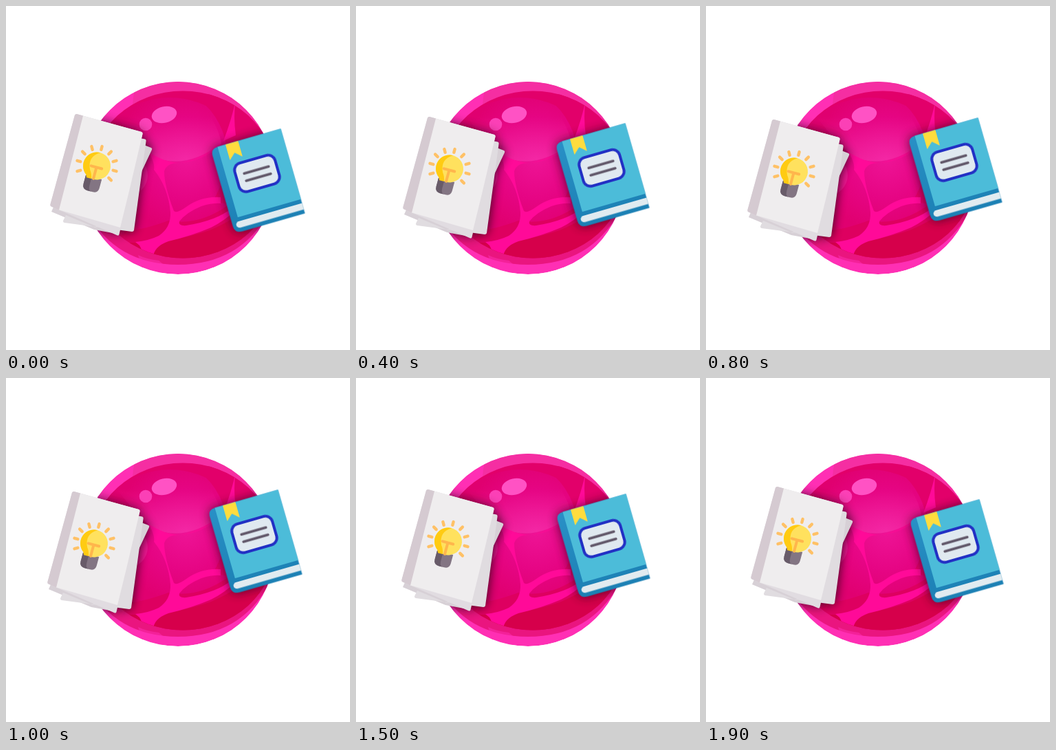
Animation, 500 px wide and 500 px high, one loop 2 s. Source, as an HTML page:

```html
<!DOCTYPE html>
<html lang="en">
<head>
<meta charset="utf-8">
<title>Ideas and books</title>
<style>
  html, body { margin: 0; width: 100%; height: 100%; overflow: hidden; background: #fff; }
  svg { display: block; width: 100%; height: 100%; }
  .papers { animation: papers 2s infinite steps(4); }
  .book { animation: book 2s infinite steps(4); }
  @keyframes papers {
    0%, 100% { transform: translate(0, 0); }
    20%, 80% { transform: translate(4px, 4px); }
    40%, 60% { transform: translate(-4px, 8px); }
  }
  @keyframes book {
    0%, 100% { transform: translate(0, 0); }
    20%, 80% { transform: translate(-8px, -8px); }
    40%, 60% { transform: translate(-4px, -16px); }
  }
</style>
</head>
<body>
<svg viewBox="0 0 500 500">
  <defs>
    <clipPath id="ball"><circle cx="250" cy="250" r="140"/></clipPath>
    <clipPath id="core"><ellipse cx="257" cy="245" rx="134" ry="121.5"/></clipPath>
    <radialGradient id="glow" gradientUnits="userSpaceOnUse" cx="262" cy="222" r="105">
      <stop offset="0" stop-color="#ee1496"/>
      <stop offset=".55" stop-color="#e60584"/>
      <stop offset="1" stop-color="#e00070"/>
    </radialGradient>
    <linearGradient id="sheen" x1="0" y1="0" x2="0" y2="1">
      <stop offset=".3" stop-color="#ff4dc0" stop-opacity="0"/>
      <stop offset="1" stop-color="#ff4dc0" stop-opacity=".35"/>
    </linearGradient>
    <linearGradient id="spine" x1="0" y1="0" x2="0" y2="1">
      <stop offset="0" stop-color="#2990c6"/>
      <stop offset="1" stop-color="#1c80b4"/>
    </linearGradient>
    <filter id="blur" x="-30%" y="-30%" width="160%" height="160%">
      <feGaussianBlur stdDeviation="7.5"/>
    </filter>
    <path id="bookShape" d="M9 -.5H104.500V127.500H10Q-1.500 127.500 -1.500 116V10Q-1.500 -.5 9 -.5Z"/>
    <g id="backSheets">
      <path d="M190 198L211 206Q213 207 212 209L155 330L128 325L66 299L70 290Z" fill="#d7d0d6"/>
      <path d="M190 191L202 193.500Q204 194 203.500 197L186 326Q185.500 328 183 328L85 315Q82 314 83.500 311L87 304L130 322Z" fill="#e0dce0"/>
    </g>
    <path id="frontSheet" d="M100 158.500Q101 156.500 103 157L197 183Q199 184 198.500 186L164.500 332Q164 334 162 333.500L66 291.500Q64 291 64.500 288Z"/>
  </defs>

  <g clip-path="url(#ball)">
    <circle cx="250" cy="250" r="140" fill="#ff2fb4"/>
    <path d="M188 118Q183 136 184 160L380 200L400 110L250 100Z" fill="#f52ea2"/>
    <path d="M118 300Q160 376 250 376Q340 376 382 300Z" fill="#ea157f"/>

    <g clip-path="url(#core)">
      <rect x="110" y="110" width="290" height="280" fill="#e2006a"/>
      <ellipse cx="238" cy="232" rx="110" ry="99" fill="url(#glow)"/>
      <path d="M272 130Q312 155 321 205Q322 250 300 284L390 300V120Z" fill="#e2006a"/>
      <path d="M120 320Q160 340 236 312Q280 320 322 290L390 270V390H120Z" fill="#de0060"/>
      <path d="M120 334Q160 346 202 344Q240 344 296 326Q335 310 385 270V390H120Z" fill="#d6004b"/>

      <path d="M160 160Q190 200 216 220Q262 238 313 200Q306 160 270 134Q200 130 160 160Z" fill="url(#sheen)"/>
      <ellipse cx="178" cy="246" rx="28" ry="29" fill="#ff4dc0" opacity=".25"/>

      <g fill="#ff0a98">
        <path d="M334 136Q328 165 316 196L334 188Q330 160 334 136Z"/>
        <path d="M206 211Q217 228 215 238Q236 264 239 300Q240 322 222 334Q208 341 188 343L194 348Q200 356 192 364L214 366Q214 350 236 342Q270 334 298 322Q318 312 332 298L328 294Q306 312 262 319Q250 320 252 313Q262 300 284 291Q300 286 312 287V278Q284 276 262 292Q248 302 244 298Q230 262 230 240Q234 227 254 228Q230 228 206 211Z"/>
        <path d="M254 228Q290 220 312 196V203Q284 226 254 228Z" opacity=".5"/>
      </g>
    </g>

    <path d="M192 362Q204 368 222 370L244 388H200Z" fill="#ff2fb4" opacity=".5"/>
    <ellipse cx="230" cy="158" rx="18.5" ry="11.8" transform="rotate(-13 230 158)" fill="#ff52c4"/>
    <circle cx="203" cy="172" r="9.3" fill="#fb40b6"/>

    <g fill="#38001c" opacity=".82" filter="url(#blur)">
      <g class="papers"><use href="#backSheets" style="filter: brightness(0)"/><use href="#frontSheet"/></g>
      <g class="book"><use href="#bookShape" transform="translate(299 207.7) rotate(-16)"/></g>
    </g>
  </g>

  <g class="papers">
    <use href="#backSheets"/>
    <use href="#frontSheet" fill="#e1dce1"/>
    <path d="M110 159L197 183Q199 184 198.500 186L179 269L166 322L76 296Z" fill="#efedee"/>
    <path d="M100 158.500Q101 156.500 103 157L112 159.500L77 296.500L66 291.500Q64 291 64.500 288Z" fill="#d5cad1"/>

    <g transform="translate(132 232.5) rotate(15)">
      <g id="rays" stroke="#ffc166" stroke-width="4.400" stroke-linecap="round"></g>
      <path d="M-12 17H12V30Q12 38 4 38H-4Q-12 38 -12 30Z" fill="#837583"/>
      <path d="M-12 17H-3V30Q-3 38 2 38H-4Q-12 38 -12 30Z" fill="#685b69"/>
      <circle r="20" fill="#ffe15e"/>
      <path d="M0 -20A20 20 0 0 0 -12 16Q-11 18 -10 20H-3Q-4 13 -8 8Q-17 -10 0 -20Z" fill="#ffcb12"/>
      <path d="M-8 2H8M0 2V19" fill="none" stroke="#ffb64c" stroke-width="4" stroke-linecap="round"/>
    </g>
  </g>

  <g class="book">
    <g transform="translate(299 207.7) rotate(-16)">
      <use href="#bookShape" fill="url(#spine)"/>
      <path d="M9 -.5H104.500V106H9Z" fill="#4cbcd9"/>
      <path d="M104.500 112H8.500A4.700 4.700 0 0 0 8.500 121.400H104.500Z" fill="#e1ebf0"/>
      <path d="M21 -.5H40V23L30.500 14.500L21 23Z" fill="#ffdc3e"/>
      <rect x="23" y="31" width="61" height="43" rx="10.500" fill="#e0e9f0" stroke="#2230c4" stroke-width="4"/>
      <path d="M35.500 47.300H72.500M35.500 58.300H72.500" stroke="#62586a" stroke-width="3.800" stroke-linecap="round"/>
    </g>
  </g>
</svg>
<script>
  const rays = document.getElementById('rays');
  for (let angle = -120; angle <= 120; angle += 30) {
    const ray = document.createElementNS('http://www.w3.org/2000/svg', 'path');
    ray.setAttribute('d', 'M0 -24.500V-29.500');
    ray.setAttribute('transform', `rotate(${angle})`);
    rays.append(ray);
  }
</script>
</body>
</html>
```
